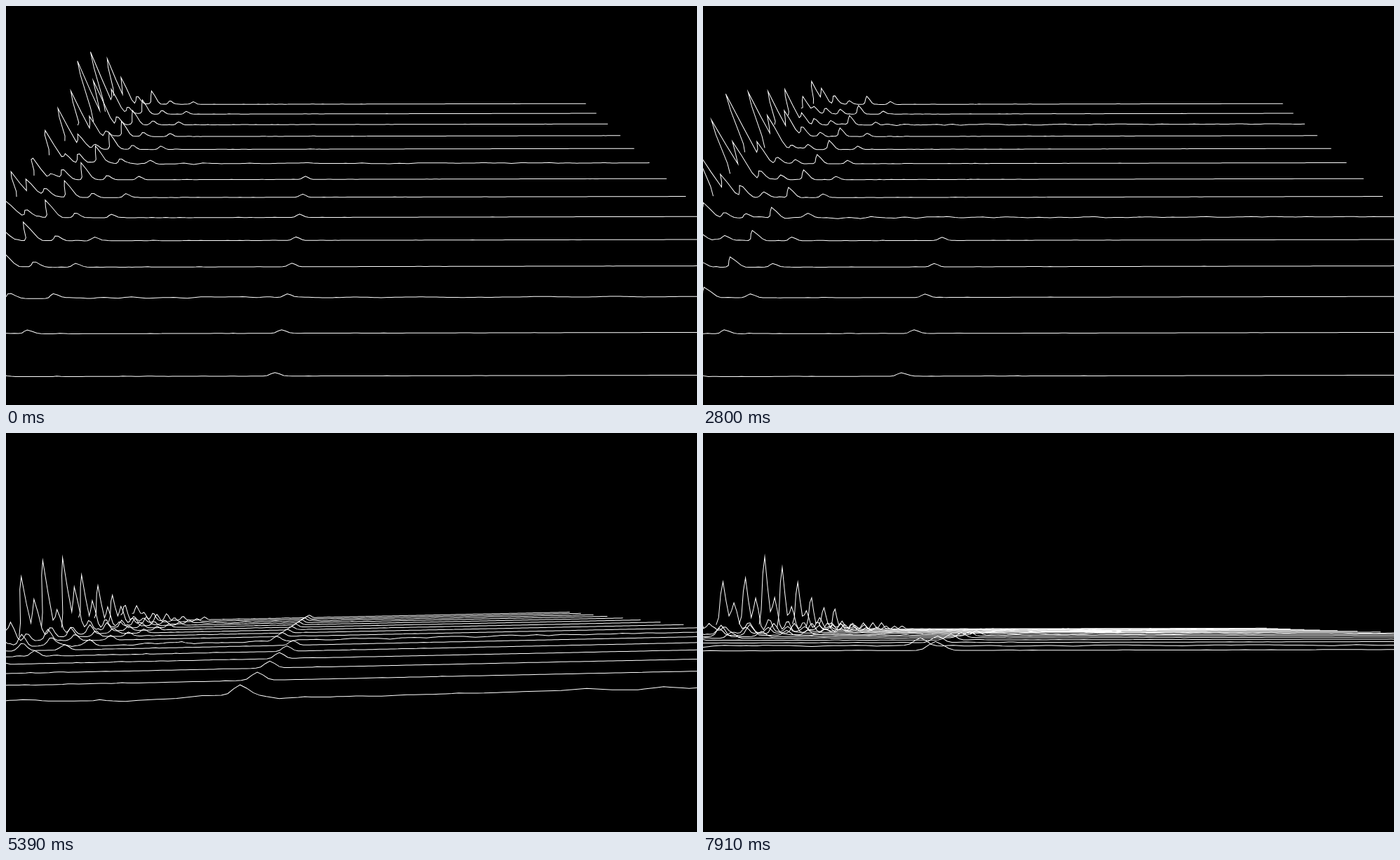
An HTML page with a canvas that plays this animation: 985 by 569 pixels, repeating every 7980 ms.

```html
<!DOCTYPE html>
<html lang="en">
<head>
<meta charset="utf-8">
<title>Spectrum waterfall</title>
<style>
  html, body { margin: 0; width: 100%; height: 100%; overflow: hidden; background: #000; }
  canvas { display: block; }
</style>
</head>
<body>
<canvas id="stage" width="985" height="569"></canvas>
<script>
const ctx = document.getElementById('stage').getContext('2d');
const W = 985, H = 569, STEP = 70, FRAMES = 114;

// World units: half the length of a line is 1.
const ROWS = 16, BINS = 256, GAP = 0.0992, MIDDLE = 7.46;
const FOCAL = 630, RADIUS = 1.285, CENTER_Y = 285.4;

// Camera keys: [ms, angle]
const pitchKeys = [[2830, 36], [3780, 20.8], [4235, 14.5], [5075, 7.1], [5390, 5.8], [6650, 1.2], [7910, 1.6]];
const rollKeys = [[2830, 0.0022], [3780, 0.0178], [5390, 0.021], [6650, 0.009], [7910, 0.002]];

// Music: a bar is three notes, a phrase is two bars. Pitches are bins, 0 is a rest.
const NOTE = 6.12, BAR = NOTE * 3;
const phrases = [
  { lead: 21, level: 0.058, tops: [109, 0, 109, 77, 77, 0] },
  { lead: 30, level: 0.034, tops: [92, 0, 0, 103, 0, 110] },
  { lead: 20, level: 0.028, tops: [110, 103, 103, 0, 0, 110] },
  { lead: 30, level: 0.026, tops: [104, 0, 0, 0, 0, 0] }
];

function at(keys, t) {
  if (t <= keys[0][0]) return keys[0][1];
  for (let i = 1; i < keys.length; i++) {
    const [t0, a] = keys[i - 1], [t1, b] = keys[i];
    if (t <= t1) return a + (b - a) * (t - t0) / (t1 - t0);
  }
  return keys[keys.length - 1][1];
}

function rand(a, b) {
  const v = Math.sin(a * 127.1 + b * 311.7 + 17.3) * 43758.5453;
  return v - Math.floor(v);
}

function smoothRand(seed, x) {
  const i = Math.floor(x), f = x - i;
  return rand(seed, i) * (1 - f) + rand(seed, i + 1) * f;
}

// Bell-shaped pulse that repeats every `period` samples
function pulse(s, first, period, width) {
  const d = s - first - period * Math.round((s - first) / period);
  return Math.exp(-((d / width) ** 2));
}

const slotOf = s => Math.floor((s + 5.5) / NOTE);

function addBump(line, bin, height) {
  const last = Math.min(BINS - 1, bin + 5);
  for (let b = Math.max(0, Math.ceil(bin - 5)); b <= last; b++) {
    line[b] += height * Math.exp(-((b - bin) ** 2) / 2.3);
  }
}

function addNote(line, slot, gain) {
  const i = Math.max(0, slot + 1);
  const { lead, level, tops } = phrases[Math.floor(i / 6)];
  addBump(line, lead, level * gain);
  addBump(line, lead === 30 ? 20 : 29.5, 0.016 * gain);
  addBump(line, 42, 0.012 * gain);
  if (tops[i % 6]) addBump(line, tops[i % 6], 0.011 * gain);
}

function makeLine(s) {
  const slot = slotOf(s), age = s + 5.5 - slot * NOTE;
  const struck = slot !== slotOf(s - 1) ? 0.004 + 0.008 * rand(slot, 900) : 0;
  const line = new Float32Array(BINS);

  for (let b = 0; b < BINS; b++) {
    line[b] = smoothRand(s + 200, b / 1.6) ** 4 * 0.004 * Math.exp(-b / 70)
      + smoothRand(s + 400, b / 2.3) ** 2 * 0.045 * Math.exp(-b / 9)
      + struck * (smoothRand(s + 900, b / 4) - 0.5) * Math.exp(-b / 180);
  }

  const bass = 0.05 + 0.04 * rand(s, 500)
    + 0.17 * pulse(s, -1.6, BAR, 2.6) + 0.1 * pulse(s, 10.2, BAR * 2, 1.2);
  addBump(line, 2.8, bass);
  addBump(line, 7, bass * (0.3 + 0.4 * rand(s, 600)));
  addBump(line, 12.5, 0.015 + 0.025 * rand(s, 700));

  addNote(line, slot, 1);
  addNote(line, slot - 1, 0.15 * Math.exp(-age / 3));
  return line;
}

const lines = new Map();
for (let s = 1 - ROWS; s < FRAMES; s++) lines.set(s, makeLine(s));

function draw(frame) {
  const ms = frame * STEP;
  const pitch = at(pitchKeys, ms) * Math.PI / 180;
  const sin = Math.sin(pitch), cos = Math.cos(pitch);

  ctx.setTransform(1, 0, 0, 1, 0, 0);
  ctx.fillStyle = '#000';
  ctx.fillRect(0, 0, W, H);
  ctx.translate(W / 2, CENTER_Y);
  ctx.rotate(-at(rollKeys, ms));
  ctx.strokeStyle = '#fff';
  ctx.lineWidth = 1;

  // The newest line is farthest away; older ones move toward the viewer.
  for (let row = 0; row < ROWS; row++) {
    const line = lines.get(frame - row);
    const z = (MIDDLE - row) * GAP;
    ctx.beginPath();
    for (let b = 0; b < BINS; b++) {
      const x = b / (BINS - 1) * 2 - 1, y = line[b];
      const scale = FOCAL / (RADIUS + z * cos - y * sin);
      ctx.lineTo(x * scale, -(z * sin + y * cos) * scale);
    }
    ctx.stroke();
  }
}

let shown = -1;
function tick() {
  const frame = Math.floor(performance.now() / STEP) % FRAMES;
  if (frame !== shown) draw(shown = frame);
  requestAnimationFrame(tick);
}
tick();
</script>
</body>
</html>
```
